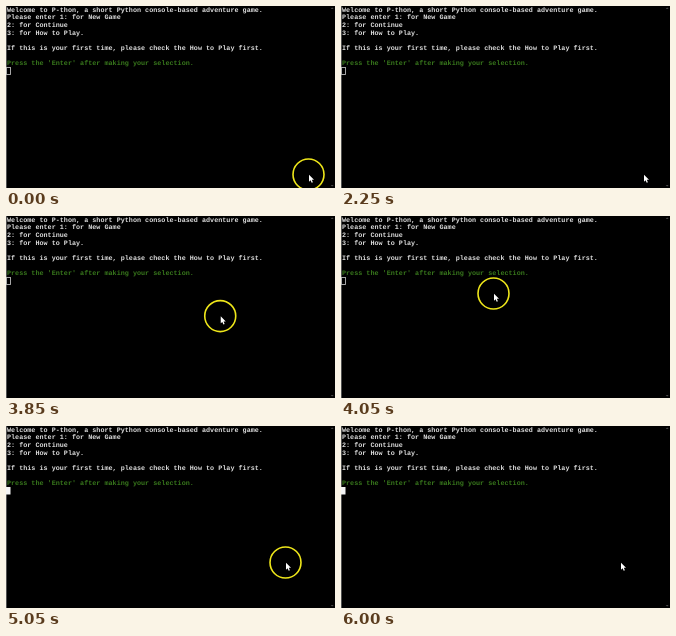
Write an HTML page with a canvas that moves like this. It is 329 by 182 pixels and loops after 8 s.

```html
<!DOCTYPE html>
<html lang="en">
<head>
<meta charset="utf-8">
<title>Console adventure</title>
<style>
  html, body { margin: 0; width: 100%; height: 100%; overflow: hidden; background: #000; }
  #stage { position: relative; width: 329px; height: 182px; overflow: hidden; background: #000; }
  /* set large and scaled down so the advance widths stay fractional */
  pre {
    position: absolute; left: 0.5px; top: 0.2px; margin: 0;
    font: bold 67.7px/77px "Liberation Mono", "Courier New", monospace;
    text-rendering: geometricPrecision;
    color: #dedede;
    transform: scale(.1); transform-origin: 0 0;
  }
  pre span { color: #38781c; }
  canvas { position: absolute; left: 0; top: 0; }
</style>
</head>
<body>
<div id="stage">
<pre>Welcome to P-thon, a short Python console-based adventure game.
Please enter 1: for New Game
2: for Continue
3: for How to Play.

If this is your first time, please check the How to Play first.

<span>Press the 'Enter' after making your selection.</span></pre>
<canvas width="329" height="182"></canvas>
</div>
<script>
const W = 329, H = 182, LOOP = 8000, FOCUS = 4250;
const ctx = document.querySelector('canvas').getContext('2d');
const arrow = new Path2D('M0 0V7L1.6 5.6L2.7 8.1L3.9 7.6L2.8 5.1H5Z');

const start = { x: 302.5, y: 168.5 };
const moves = [
  { from: 3000, to: 3480, x: 286.5, y: 126.5 },
  { from: 3630, to: 4050, x: 152.5, y: 77.5 },
  { from: 4180, to: 4900, x: 279.5, y: 136.5 }
];

const ramp = (t, from, to) => Math.min(1, Math.max(0, (t - from) / (to - from)));
const smooth = u => u * u * (3 - 2 * u);

function pointerAt(t) {
  let { x, y } = start;
  for (const m of moves) {
    const u = smooth(ramp(t, m.from, m.to));
    x += (m.x - x) * u;
    y += (m.y - y) * u;
  }
  return [x, y];
}

// the ring fades when the pointer rests and returns as it moves
const ringAlpha = t => 1 - ramp(t, 100, 650) + ramp(t, 3200, 3400) - ramp(t, 5150, 5800);

function drawWindow() {
  ctx.fillStyle = '#666';
  ctx.fillRect(0, 0, 0.8, H);
  ctx.fillStyle = '#484848';
  for (const side of [-1, 1]) {
    const y = H / 2 + side * 88;
    ctx.beginPath();
    ctx.moveTo(324.7, y);
    ctx.lineTo(327.7, y);
    ctx.lineTo(326.2, y + side * 1.5);
    ctx.fill();
  }
}

function drawCaret(solid) {
  ctx.fillStyle = '#f4f4f4';
  ctx.strokeStyle = '#b8b8b8';
  ctx.lineWidth = 0.9;
  if (solid) ctx.fillRect(0, 61, 4.5, 7.5);
  else ctx.strokeRect(0.5, 61.5, 4, 7);
}

function drawRing(x, y, alpha) {
  ctx.globalAlpha = alpha;
  ctx.strokeStyle = '#eee61a';
  ctx.lineWidth = 1.6;
  ctx.beginPath();
  ctx.arc(x, y, 15.5, 0, Math.PI * 2);
  ctx.stroke();
  ctx.globalAlpha = 1;
}

function drawPointer(x, y) {
  ctx.save();
  ctx.translate(x + 0.5, y + 0.2);
  ctx.strokeStyle = '#000';
  ctx.lineWidth = 1;
  ctx.stroke(arrow);
  ctx.fillStyle = '#fff';
  ctx.fill(arrow);
  ctx.restore();
}

function frame(now) {
  const t = now % LOOP;
  const [x, y] = pointerAt(t);
  ctx.clearRect(0, 0, W, H);
  drawWindow();
  drawCaret(t >= FOCUS);
  drawRing(x, y, ringAlpha(t));
  drawPointer(x, y);
  requestAnimationFrame(frame);
}
requestAnimationFrame(frame);
</script>
</body>
</html>
```
